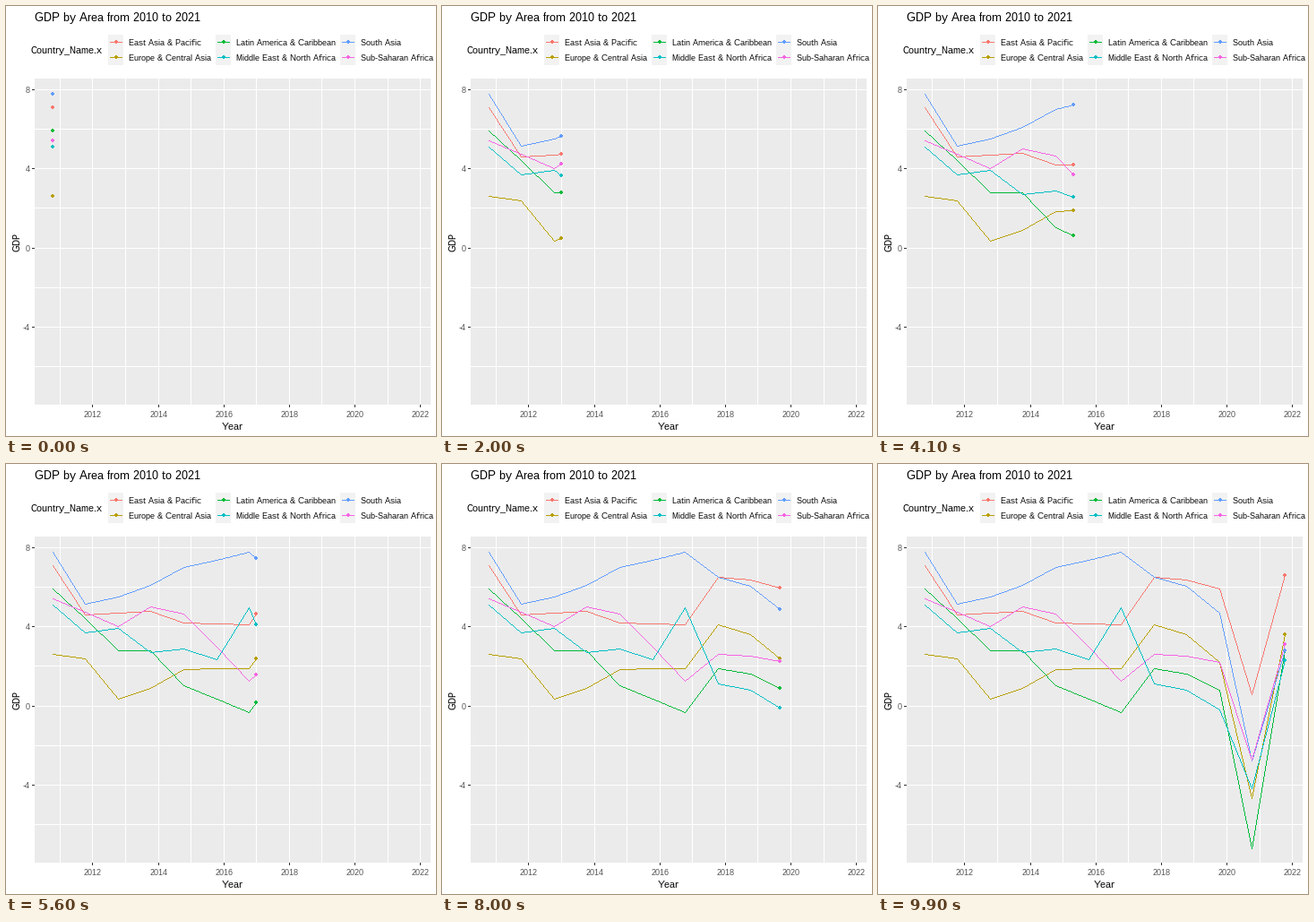
A matplotlib script that plays this animation: 480 by 480 pixels, repeating every 10 s.

```python
import matplotlib.pyplot as plt
import numpy as np
from matplotlib.animation import FuncAnimation
from matplotlib.colors import to_rgb

SIZE, DPI = 480, 100
PX = 72 / DPI  # one pixel in points
FRAMES, STEP = 100, 9  # nine frames per year
X0, X1 = 52.2, 454.4
Y0, UNIT = 270.08, 22.09
LEFT, RIGHT, TOP, BOTTOM = 32, 474, 81, 445

# Key years of every curve; the years between them follow from rules.
KEYS = [0, 1, 2, 3, 4, 6, 7, 9, 10, 11]


def yearly(*values, dip=0):
    """Twelve yearly values: straight runs, a dip in year 5, a late slide."""
    v = np.interp(np.arange(12), KEYS, values)
    v[5] -= dip
    v[8] = v[7] + (v[9] - v[7]) * 0.5 ** 2
    return v


SERIES = [
    ("East Asia & Pacific", "#F8766D",
     yearly(7.1, 4.6, 4.7, 4.8, 4.2, 4.1, 6.5, 5.9, 0.55, 6.6)),
    ("Europe & Central Asia", "#B79F00",
     yearly(2.6, 2.4, 0.35, 0.9, 1.85, 1.9, 4.1, 2.2, -4.7, 3.6)),
    ("Latin America & Caribbean", "#00BA38",
     yearly(5.9, 4.4, 2.8, 2.8, 1, -0.35, 1.9, 0.8, -7.2, 2.8)),
    ("Middle East & North Africa", "#00BFC4",
     yearly(5.1, 3.7, 3.9, 2.7, 2.9, 4.95, 1.1, -0.2, -4.2, 2.3, dip=1.6)),
    ("South Asia", "#619CFF",
     yearly(7.75, 5.15, 5.5, 6.1, 7, 7.75, 6.5, 4.7, -2.8, 2.8)),
    ("Sub-Saharan Africa", "#F564E3",
     yearly(5.4, 4.75, 4, 5, 4.65, 1.25, 2.6, 2.2, -2.75, 3.1)),
]

plt.rcParams.update({
    "font.family": "Liberation Sans",
    "text.hinting": "native",
    "text.hinting_factor": 1,
})

fig = plt.figure(figsize=(SIZE / DPI, SIZE / DPI), dpi=DPI, facecolor="white")
ax = fig.add_axes([0, 0, 1, 1])
ax.axis("off")
base = np.full((SIZE, SIZE, 3), 255, np.uint8)


def x_px(frame):
    return (X0 + (X1 - X0) * np.asarray(frame) / (FRAMES - 1)).astype(int)


def y_px(value):
    return (Y0 - UNIT * np.asarray(value)).astype(int)


def rgb(color):
    return np.rint(np.multiply(to_rgb(color), 255)).astype(np.uint8)


def box(img, x, y, w, h, color):
    img[y:y + h, x:x + w] = rgb(color)


def polyline(img, xs, ys, color):
    """Hard-edged line, one pixel wide."""
    for xa, ya, xb, yb in zip(xs, ys, xs[1:], ys[1:]):
        n = max(abs(xb - xa), abs(yb - ya)) + 1
        cols = np.rint(np.linspace(xa, xb, n)).astype(int)
        rows = np.rint(np.linspace(ya, yb, n)).astype(int)
        img[rows, cols] = rgb(color)


def dot(img, x, y, color):
    """Four-pixel disc without its corners."""
    box(img, x - 2, y - 1, 4, 2, color)
    box(img, x - 1, y - 2, 2, 4, color)


def text(x, y, s, size, color="black", ha="left", **kw):
    ax.text(x, y, s, fontsize=size * PX, color=color, ha=ha, va="baseline",
            **kw)


def draw_panel():
    box(base, LEFT, TOP, RIGHT - LEFT, BOTTOM - TOP, "#EBEBEB")
    for v in range(-6, 9, 2):
        y = y_px(v)
        box(base, LEFT, y, RIGHT - LEFT, 1, "white")
        if v % 4 == 0:
            box(base, LEFT - 3, y, 3, 1, "#333333")
            text(27, y + 4, str(v), 9, "#4D4D4D", "right")
    for year in range(2011, 2023):
        x = int(96.9 + 36.57 * (year - 2012))
        box(base, x, TOP, 1, BOTTOM - TOP, "white")
        if year % 2 == 0:
            box(base, x, BOTTOM, 1, 3, "#333333")
            text(x + 0.5, 459, str(year), 9, "#4D4D4D", "center")
    text(32, 17, "GDP by Area from 2010 to 2021", 13)
    text(253, 473, "Year", 11, ha="center")
    text(15, 263, "GDP", 11, ha="center", rotation=90,
         rotation_mode="anchor")


def draw_legend():
    text(28, 53, "Country_Name.x", 11)
    for i, (name, color, _) in enumerate(SERIES):
        x, y = (123, 243, 382)[i // 2], 40 + 17 * (i % 2)
        box(base, x - 9, y - 8, 17, 17, "#F2F2F2")
        box(base, x - 7, y, 14, 1, color)
        dot(base, x, y, color)
        text(x + 14, y + 4, name, 9)


draw_panel()
draw_legend()
canvas = ax.imshow(base, extent=(0, SIZE, SIZE, 0), aspect="auto",
                   interpolation="nearest")
ax.set(xlim=(0, SIZE), ylim=(SIZE, 0))
knots = np.arange(12) * STEP


def update(frame):
    img = base.copy()
    seen = np.append(knots[knots < frame], frame)
    xs = x_px(seen)
    curves = [(y_px(np.interp(seen, knots, values)), color)
              for _, color, values in SERIES]
    for ys, color in curves:
        polyline(img, xs, ys, color)
    for ys, color in curves:
        dot(img, xs[-1], ys[-1], color)
    canvas.set_data(img)
    return [canvas]


anim = FuncAnimation(fig, update, frames=FRAMES, interval=100, repeat=True,
                     repeat_delay=0, blit=False)
plt.show()
```
